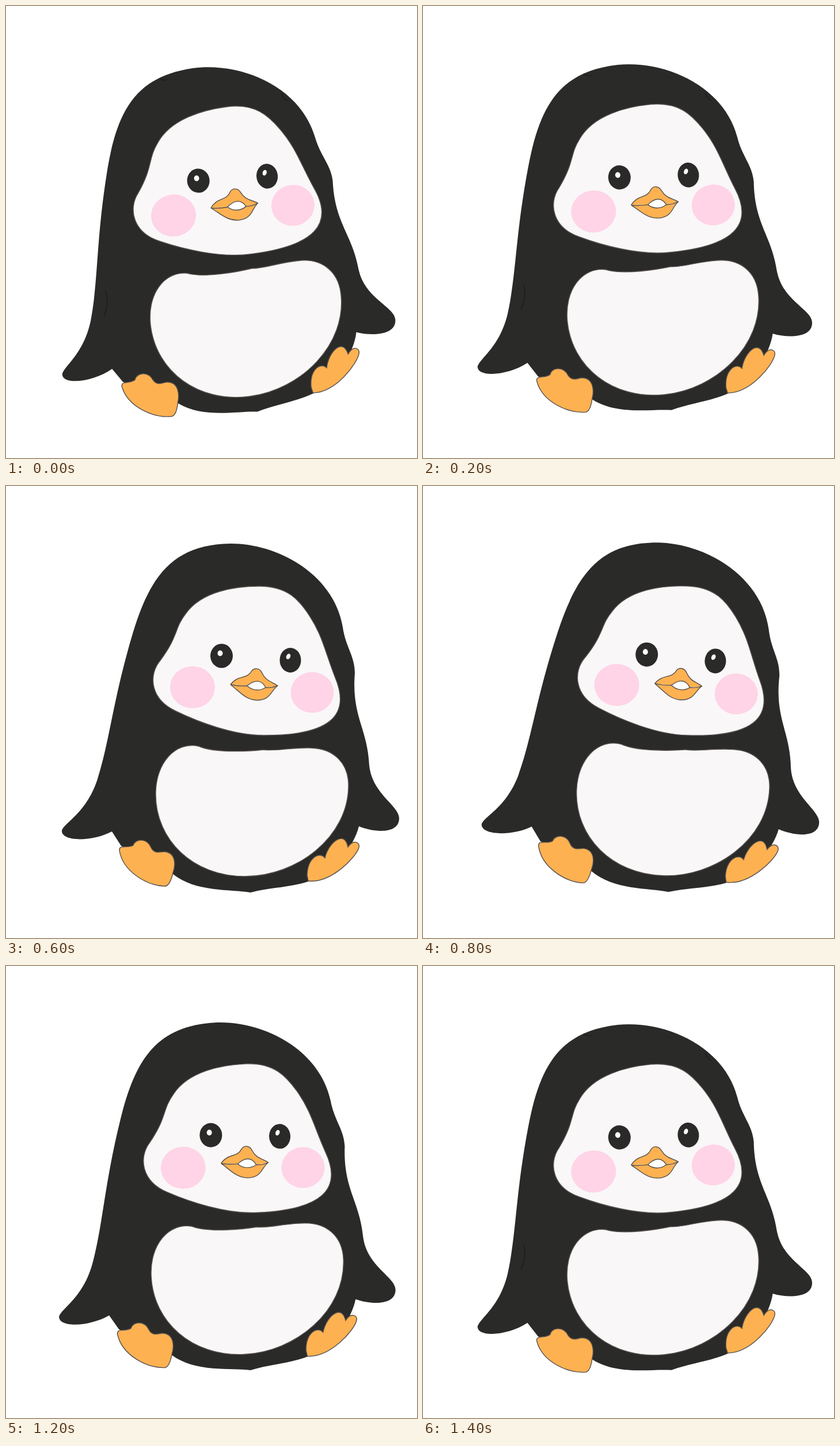
Animation, 714 px wide and 785 px high, one loop 1600 ms. Source, as an HTML page:

```html
<!DOCTYPE html>
<html lang="en">
<head>
<meta charset="utf-8">
<title>Swaying penguin</title>
<style>
html, body { margin: 0; width: 100%; height: 100%; overflow: hidden; background: #fff; }
svg { display: block; width: 100%; height: 100%; }
.ink { fill: #2a2a28; }
.skin { fill: #faf7f8; }
.orange { fill: #feb151; }
.pink { fill: #fed4e6; }
.shine { fill: #fff; }
.line { stroke: #55504e; stroke-width: 1.4; }
#creases { fill: none; stroke: #1d1d1c; stroke-width: 1.5; }
</style>
</head>
<body>
<svg viewBox="0 0 714 785">
  <g id="bird">
    <!-- body and wings -->
    <path class="ink" d="M390 100 C475 100 570 155 585 245 C590 280 606 295 606 325
      C600 400 628 420 631 485 C636 535 683 555 683 577 C683 605 640 602 613 591
      C605 625 570 670 525 687 C490 698 460 697 425 706 C390 700 330 706 290 674
      L200 625 184 600 C150 618 97 618 97 599 C100 585 138 570 158 512
      C180 445 185 375 219 260 C250 155 290 102 390 100Z"/>
    <path id="creases" d="M330 110q6 6 15 4M537 163q2 10 10 15M190 464q5 20-8 43"/>

    <!-- face -->
    <path class="skin line" d="M440 174 C490 174 510 199 527 225 C550 260 555 290 572 333
      C600 400 560 433 450 433 C395 434 330 408 295 391 C250 370 247 328 268 303
      C300 260 292 248 312 222 C340 182 400 174 440 174Z"/>
    <ellipse class="pink" cx="324" cy="349.5" rx="39" ry="36.5"/>
    <ellipse class="pink" cx="532" cy="358.5" rx="37.5" ry="35.5"/>
    <ellipse class="ink" cx="374.5" cy="295" rx="19.5" ry="21"/>
    <ellipse class="shine" cx="372" cy="290.5" rx="4.5" ry="5"/>
    <ellipse class="ink" cx="494" cy="302.5" rx="18.5" ry="21.5"/>
    <ellipse class="shine" cx="490.5" cy="296" rx="3.5" ry="5" transform="rotate(25 490.5 296)"/>

    <!-- beak -->
    <path class="orange line" d="M390 345 C403 327 418 337 427 321 C432 315 441 316 445 325
      C451 339 463 340 472 347 C460 355 460 372 436 372 C415 371 405 356 390 345
      Q405 348 419 347 M451 350 Q461 351 472 347"/>
    <path class="shine line" d="M419 347 C432 336 444 336 451 350 C440 357 427 355 419 347Z"/>

    <!-- belly -->
    <path class="skin line" d="M260 535 C260 615 325 678 415 678 S595 610 595 520
      C595 482 570 456 530 455 S472 461 447 458 C430 460 365 465 335 452
      C295 443 260 480 260 535Z"/>

    <!-- feet -->
    <path class="orange line" d="M197 633 C196 622 212 630 221 624 C225 612 245 611 252 628
      C258 640 268 635 275 635 C297 637 294 661 290 672 C287 685 283 695 276 695
      C245 694 203 670 197 633Z"/>
    <path class="orange line" d="M523 676 C524 645 545 634 554 646 C560 620 588 596 594 627
      C605 612 616 620 613 628 C608 645 565 690 525 686Z"/>
  </g>
</svg>
<script>
const bird = document.getElementById("bird");
const creases = document.getElementById("creases");

// Place of the pivot and lean in degrees, played there and back
const POSES = [
  { x: 387, y: 592, lean: -7.35 },
  { x: 385.3, y: 587.8, lean: -5.6 },
  { x: 384.4, y: 585.7, lean: -2.55 },
  { x: 390, y: 588, lean: 0 },
  { x: 395, y: 586, lean: 1.8 }
];
const STEP = 200;
const CYCLE = 2 * (POSES.length - 1);

function draw(time) {
  const n = Math.floor(time / STEP) % CYCLE;
  const i = Math.min(n, CYCLE - n);
  const { x, y, lean } = POSES[i];
  bird.setAttribute("transform", `translate(${x} ${y}) rotate(${lean}) translate(-390 -588)`);
  creases.style.opacity = i < 2 ? 1 : 0; // only while leaning left
}

const start = performance.now();
function tick() {
  draw(performance.now() - start);
  requestAnimationFrame(tick);
}
tick();
</script>
</body>
</html>
```
